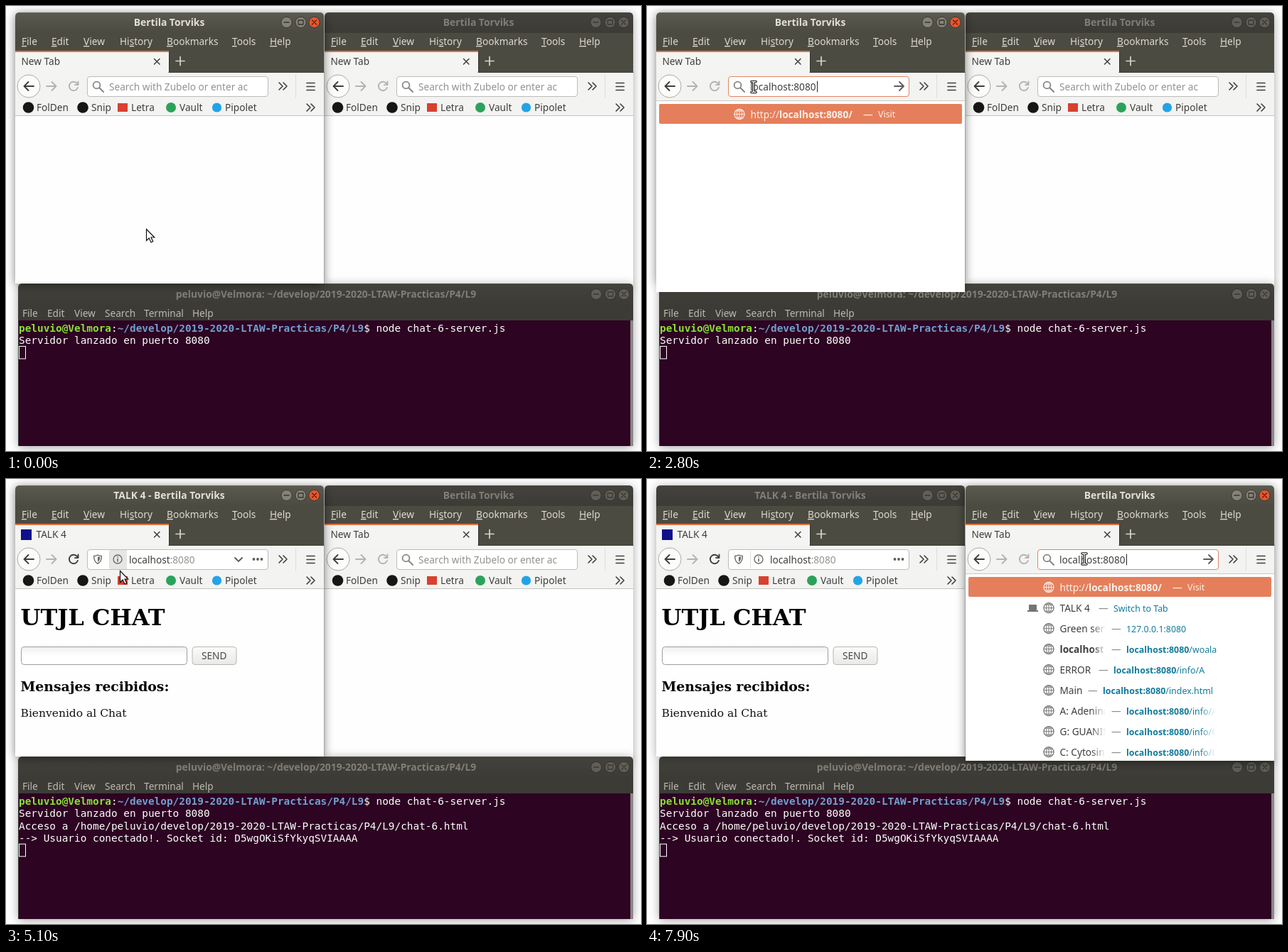
Recreate the animation shown at these times as an HTML page. Size 893x627 px, loop 8000 ms.

```html
<!DOCTYPE html>
<html lang="es">
<head>
<meta charset="utf-8">
<title>Chat demo</title>
<style>
  html, body { margin: 0; width: 100%; height: 100%; overflow: hidden; background: #fefefe; }
  svg { display: block; width: 893px; height: 627px; }
  text { white-space: pre; font: 13.65px "Noto Sans", "Open Sans", sans-serif; }
  .bold { font-weight: 700; }
  .title { font-size: 13.85px; font-weight: 700; text-anchor: middle; }
  .small { font-size: 12.4px; }
  .mono { font: 14.4px "DejaVu Sans Mono", "Noto Sans Mono", monospace; }
  .h1 { font: 700 32px "DejaVu Serif", serif; }
  .h3 { font: 700 18.8px "DejaVu Serif", serif; }
  .body { font: 15.5px "DejaVu Serif", serif; }
  .u { text-decoration: underline; }
</style>
</head>
<body>
<svg viewBox="0 0 893 627">
  <defs>
    <linearGradient id="active" x2="0" y2="1"><stop stop-color="#5b5a50"/><stop offset="1" stop-color="#4c4b42"/></linearGradient>
    <linearGradient id="idle" x2="0" y2="1"><stop stop-color="#43423c"/><stop offset="1" stop-color="#3c3b36"/></linearGradient>
    <linearGradient id="field" x2="0" y2="1"><stop stop-color="#efefee"/><stop offset=".5" stop-color="#fff"/></linearGradient>
    <linearGradient id="button" x2="0" y2="1"><stop stop-color="#fbfbfa"/><stop offset="1" stop-color="#e9e9e7"/></linearGradient>
    <linearGradient id="fade"><stop stop-color="#fff" stop-opacity="0"/><stop offset="1" stop-color="#fff"/></linearGradient>
    <filter id="shadow" x="-15%" y="-15%" width="130%" height="130%"><feGaussianBlur stdDeviation="7"/></filter>
    <clipPath id="urlClip"><rect x="115" y="99" width="226.5" height="28"/></clipPath>
    <clipPath id="rightClip"><rect x="13" y="9" width="434" height="388"/></clipPath>
  </defs>
  <g id="stage"></g>
</svg>
<script>
const LOOP = 8000, STEP = 100;
const APP = 'Bertila Torviks', PAGE = 'TALK 4', USER = 'peluvio', HOST = 'Velmora';
const PATH = '/develop/2019-2020-LTAW-Practicas/P4/L9';
const INK = '#3e3e3c', MUTED = '#b3b3b0', HINT = '#929290', ORANGE = '#e08562', LINK = '#127a9c';

const stage = document.getElementById('stage');
const rect = (x, y, w, h, fill, more = '') => `<rect x="${x}" y="${y}" width="${w}" height="${h}" fill="${fill}" ${more}/>`;
const text = (x, y, s, fill = INK, cls = '', more = '') => `<text x="${x}" y="${y}" fill="${fill}" class="${cls}" ${more}>${s}</text>`;
const line = (d, color = INK, w = 1.6) => `<path d="${d}" fill="none" stroke="${color}" stroke-width="${w}" stroke-linecap="round" stroke-linejoin="round"/>`;
const disc = (x, y, r, fill, more = '') => `<circle cx="${x}" cy="${y}" r="${r}" fill="${fill}" ${more}/>`;
const when = (on, ...parts) => on ? parts.join('') : '';

const chevron = x => line(`M${x - 5} 111l5 5l5-5`, '#5c5c5a', 1.8);
const doubleAngle = (x, y) => line(`M${x - 5} ${y - 5}l5 5l-5 5M${x + 1} ${y - 5}l5 5l-5 5`);
const magnifier = line('M131.5 115.5L137 121', '#858583', 2) + disc(127.5, 111.5, 4.9, 'none', 'stroke="#858583" stroke-width="1.8"');

function frame(x, y, w, h, fill, active) {
  const top = `M${x} ${y + 29}V${y + 6}q0-6 6-6H${x + w - 6}q6 0 6 6V${y + 29}Z`;
  return rect(x, y + 2, w, h, '#000', `rx="5" opacity="${active ? .5 : .34}" filter="url(#shadow)"`) +
    rect(x, y + 20, w, h - 20, fill) +
    `<path d="${top}" fill="url(#${active ? 'active' : 'idle'})"/>` +
    line(`M${x + 5} ${y + .5}H${x + w - 5}`, active ? '#6d6b61' : '#504f48', 1);
}

function windowButtons(x, y, active) {
  const fill = active ? '#858276' : '#605e56', edge = active ? '#3a3933' : '#34332f';
  const mark = active ? '#36352f' : '#393832';
  const button = (cx, color) => disc(cx, y, 7.6, color, `stroke="${edge}" stroke-width="1"`);
  return button(x, fill) + button(x + 20, fill) + button(x + 39, active ? '#e8572f' : fill) +
    line(`M${x - 3.5} ${y}h7M${x + 16.5} ${y - 3}h7v6h-7z`, mark, 1.3) +
    line(`M${x + 36} ${y - 3}l6 6m0-6l-6 6`, active ? '#5b2010' : mark, 1.4);
}

function chrome(active, title) {
  const menu = [[22, '', 'F', 'ile'], [64, '', 'E', 'dit'], [109, '', 'V', 'iew'], [160, 'Hi', 's', 'tory'],
    [226, '', 'B', 'ookmarks'], [318, '', 'T', 'ools'], [371, '', 'H', 'elp']];
  return text(229.5, 28, title, active ? '#e3dfd7' : '#817e76', 'title') + windowButtons(394.5, 23, active) +
    rect(13, 38, 434, 56, '#4c4b41') +
    menu.map(([x, a, key, b]) => text(x, 55, `${a}<tspan class="u">${key}</tspan>${b}`, '#dedad1')).join('') +
    rect(13, 63, 216, 32, '#f4f4f2') + rect(13, 63, 216, 2, '#e2703f') +
    line('M229.5 65V93', '#34332d', 1) + line('M229 93.5H447', '#3b3a33', 1) +
    line('M208.5 74.5l7.5 7.5m0-7.5l-7.5 7.5', INK, 1.5) +
    line('M239 77.5h12m-6-6v12', '#d8d5cc', 1.7);
}

function toolbar(reloadable) {
  const reload = reloadable ? INK : MUTED;
  const marks = [['FolDen', 43], ['Snip', 120], ['Letra', 176], ['Vault', 244], ['Pipolet', 308]];
  return rect(13, 94, 434, 61, '#f3f3f1') + line('M13 154.5H447', '#c4c4c1', 1) +
    disc(32, 113, 16, '#fcfcfb', 'stroke="#aaaaa7" stroke-width="1"') +
    line('M39 113H25.5m6-6l-6 6l6 6', INK, 1.9) +
    line('M57 113h13.5m-6-6l6 6l-6 6', MUTED, 1.9) +
    line('M100.2 109.5a6.2 6.2 0 1 0 .7 5.5M101.5 106.5v4.6h-4.6', reload, 1.9) +
    doubleAngle(389, 113) + line('M407.5 97V129', '#dddddb', 1) +
    line('M423 108.5h11m-11 5h11m-11 5h11', INK, 1.7) +
    disc(31.5, 143, 7.8, '#161614') + disc(108, 143, 7.8, '#161614') +
    rect(157, 137, 14, 12, '#d8402f') + disc(232, 143, 7, '#2ba25a') + disc(296.5, 143, 6.6, '#22a3e8') +
    marks.map(([s, x]) => text(x, 147.7, s)).join('') + doubleAngle(428, 143);
}

function urlBar(o) {
  let s = rect(114.5, 99.5, 254, 28, '#fff', `rx="3.5" stroke="${o.focus ? ORANGE : '#bcbcb9'}" stroke-width="1"`);
  if (o.site) {
    s += when(o.hover, rect(146, 100, 24, 27, '#e6e6e4'));
    s += line('M129 107q3 1.6 5.3 1.4q.4 8-5.3 11q-5.7-3-5.3-11q2.3.2 5.3-1.4z', '#676765', 1.4) +
      '<path d="M129 109.5v7.5q3.3-2.5 3.3-7z" fill="#676765"/>' + line('M145.5 102V125', '#dededc', 1) +
      disc(157, 113, 6, 'none', 'stroke="#676765" stroke-width="1.3"') + line('M157 112.5v3.5m0-6.2v.1', '#676765', 1.6);
    s += [348.5, 354, 359.5].map(x => disc(x, 113, 1.9, '#5c5c5a')).join('') + when(o.hover, chevron(327));
  } else {
    s += magnifier + when(!o.typed && (o.hover || o.focus), chevron(354));
  }
  if (o.typed || o.site) {
    s += text(o.site ? 173 : 145, 118.5, `localhost<tspan fill="${o.focus ? INK : HINT}">:8080</tspan>`);
    s += when(o.focus, line('M239.5 106V121', '#222', 1), line('M348 113h13m-6-6l6 6l-6 6', '#5c5c5a', 1.8));
  } else {
    s += text(145, 118.5, 'Search with Zubelo or enter ac', HINT, '', 'clip-path="url(#urlClip)"');
    s += when(o.focus, line('M145.5 106V121', '#222', 1));
  }
  return s;
}

const globe = (y, color) => disc(130, y, 7, 'none', `stroke="${color}" stroke-width="1.3"`) +
  line(`M123 ${y}h14M130 ${y - 7}v14M125 ${y - 4.5}h10M125 ${y + 4.5}h10`, color, 1) +
  `<ellipse cx="130" cy="${y}" rx="3.6" ry="7" fill="none" stroke="${color}"/>`;

// Suggestion list: title, x of the dash, address suffix or note
function dropdown(full, bottom, openTab) {
  const rows = [[PAGE, 200, openTab ? 'Switch to Tab' : '/'], ['Green serv', 218, '127.0.0.1:8080'],
    ['localhost', 218, '/woala'], ['ERROR', 200, '/info/A'], ['Main', 185, '/index.html'],
    ['A: Adenina', 218, '/info/A'], ['G: GUANINA', 218, '/info/G'], ['C: Cytosina', 218, '/info/C']];
  let s = rect(13, 133, 434, bottom - 133, '#fff') + line('M13 133.5H447', '#c9c9c6', 1) +
    rect(17, 138, 426, 28, '#e57f5b', 'rx="2"') + globe(152.5, '#fbe9e2') +
    text(145.5, 157.5, 'http://<tspan class="bold">localhost:8080/</tspan>', '#fdf1ec') +
    text(304, 157.5, '—', '#fdf1ec') + text(325, 157.2, 'Visit', '#fdf1ec', 'small');
  if (!full) return s;
  rows.forEach(([name, dash, note], i) => {
    const y = 181.7 + 29 * i, long = dash === 218;
    const address = note[0] === '/' ? `<tspan class="bold">localhost:8080</tspan>${note}` : note;
    s += globe(y, '#7b7b79') + text(145.5, y + 5, name, INK, i === 2 ? 'bold' : '');
    s += when(long, rect(190, y - 10, 20, 20, 'url(#fade)'), rect(210, y - 10, 20, 20, '#fff'));
    s += text(dash, y + 5, '—', '#8b8b89') + text(dash + 21, y + 4.8, address, LINK, 'small');
    s += when(i > 4, rect(343, y - 10, 22, 20, 'url(#fade)'), rect(365, y - 10, 40, 20, '#fff'));
  });
  return s + when(openTab, rect(102, 177, 11, 8, '#747472', 'rx="1"'), rect(100, 185, 15, 2, '#747472'));
}

function leftWindow(t) {
  const active = t < 6900, page = t >= 3500, loading = t >= 3200 && t < 3700;
  const open = t >= 2800 && t < 3200;
  const dot = 23 + 5 * ((t - 3200) / STEP % 3);
  return frame(13, 9, 434, 382, '#fefefe', active) + chrome(active, page ? `${PAGE} - ${APP}` : APP) +
    when(loading, disc(dot, 78, 1.7, '#777')) + when(t >= 3700, rect(21, 71, 15, 15, '#10108c')) +
    text(loading || page ? 42.5 : 21.5, 83, page ? PAGE : 'New Tab') +
    toolbar(t >= 3200) +
    urlBar({ focus: t >= 1600 && t < 3200, hover: t >= 1500 && t < 1600 || t >= 3800 && t < 5300, typed: t >= 2800, site: page }) +
    when(page, text(20.5, 206, 'UTJL CHAT', '#000', 'h1'),
      rect(21.5, 236.5, 233, 25, 'url(#field)', 'rx="4" stroke="#9c9c99"'),
      rect(262, 236.5, 62, 25, 'url(#button)', 'rx="4" stroke="#b7b7b4"'),
      text(275, 254, 'SEND', '#4a4a48'), text(20.5, 298.5, 'Mensajes recibidos:', '#000', 'h3')) +
    when(t >= 3600, text(20.5, 335, 'Bienvenido al Chat', '#111', 'body')) +
    when(open, dropdown(t >= 2900, 403, false));
}

function rightWindow(t) {
  const active = t >= 6900, typed = t >= 7800;
  return '<g transform="translate(435)">' + frame(13, 9, 434, 388, '#fefefe', active) +
    chrome(active, APP) + text(21.5, 83, 'New Tab') + toolbar(false) +
    urlBar({ focus: active, hover: t >= 6400, typed }) +
    when(typed, `<g clip-path="url(#rightClip)">${dropdown(t >= 7900, 397, true)}</g>`) + '</g>';
}

function terminal(t) {
  const menu = [['File', 23], ['Edit', 58], ['View', 96], ['Search', 139], ['Terminal', 194], ['Help', 262]];
  const row = n => 459 + 17.4 * n;
  const out = ['Servidor lanzado en puerto 8080'];
  if (t >= 3300) out.push(`Acceso a /home/${USER}${PATH}/chat-6.html`);
  if (t >= 3600) out.push('--&gt; Usuario conectado!. Socket id: D5wgOKiSfYkyqSVIAAAA');
  const prompt = `<tspan class="bold" fill="#8ae234">${USER}@${HOST}</tspan>:` +
    `<tspan class="bold" fill="#729fcf">~${PATH}</tspan>$ node chat-6-server.js`;
  return frame(17, 391, 865, 229, '#3c3b36', false) +
    text(450, 411, `${USER}@${HOST}: ~${PATH}`, '#817e76', 'title') + windowButtons(830, 406, false) +
    menu.map(([s, x]) => text(x, 438, s, '#bdb9b0')).join('') +
    rect(18, 443, 864, 177, '#2d0422') + rect(878, 443, 4, 177, '#8d8688') +
    text(18, row(0), prompt, '#fff', 'mono') +
    out.map((s, i) => text(18, row(i + 1), s, '#fff', 'mono')).join('') +
    rect(18.5, 479.5 + 17.4 * (out.length - 1), 9, 17.5, 'none', 'stroke="#fff"');
}

const clamp = u => Math.max(0, Math.min(1, u));
const smooth = u => u * u * (3 - 2 * u);

function pointer(t) {
  if (t < 3800) {
    const u = smooth(clamp((t - 900) / 600));
    return [197 - 47 * u, 314 - 200 * u, u > .94];
  }
  if (t < 5300) {
    const u = clamp((t - 4900) / 200);
    return [148 + 12 * u, 111 + 18 * u, false];
  }
  if (t <= 6100) {
    const u = (t - 5200) / 900;
    return [160 + 285 * u ** 5.69, 129 + 38 * smooth(clamp(u / .88)), false];
  }
  const left = (1 - clamp((t - 6100) / 500)) ** 2;
  return [615 - 170 * left, 112.5 + 54 * left, t >= 6400];
}

function cursor(t) {
  const [x, y, beam] = pointer(t);
  const bar = 'M-3-7.5h2l1 1l1-1h2M0-7V7M-3 7.5h2l1-1l1 1h2';
  const shape = beam
    ? line(bar, '#111', 3.6) + line(bar, '#fff', 1.3)
    : '<path d="M.5.5V16.5L4.2 13L7 19L9.7 17.8L7 12H11.8Z" fill="#fff" stroke="#111" stroke-width="1.2"/>';
  return `<g transform="translate(${x.toFixed(1)} ${y.toFixed(1)})">${shape}</g>`;
}

function draw(t) {
  const left = leftWindow(t), right = rightWindow(t), term = terminal(t);
  const layers = t < 6900 ? [right, term, left] : [term, left, right];
  stage.innerHTML = layers.join('') + cursor(t);
}

let shown = -1;
const start = performance.now();
function tick(now) {
  const t = Math.floor(Math.max(0, now - start) % LOOP / STEP) * STEP;
  if (t !== shown) draw(shown = t);
  requestAnimationFrame(tick);
}
draw(0);
requestAnimationFrame(tick);
</script>
</body>
</html>
```
